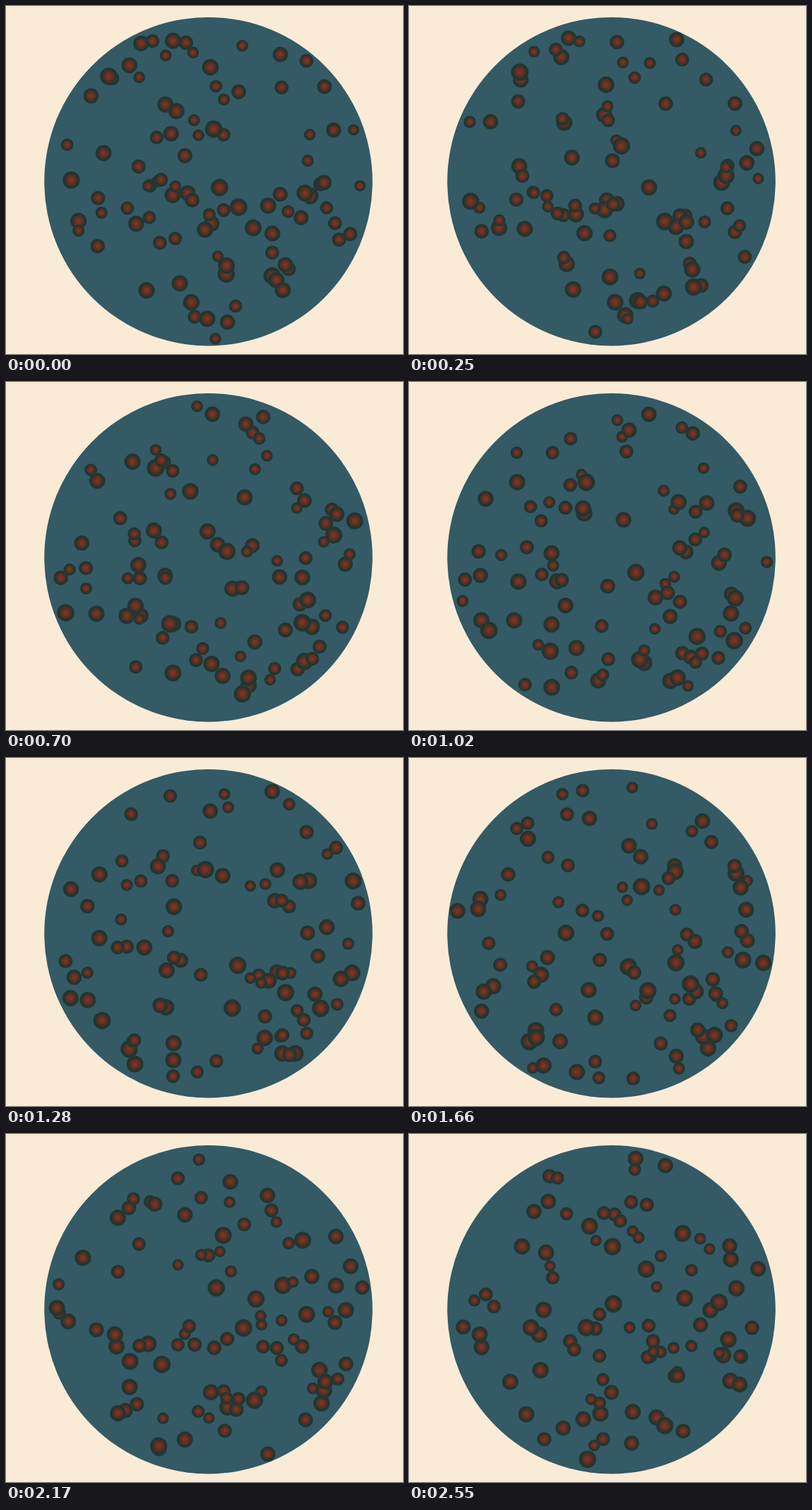
Recreate the animation shown at these times as an HTML page. Size 562x492 px, loop 2600 ms.

```html
<!DOCTYPE html>
<html lang="en">
<head>
<meta charset="utf-8">
<title>Particles in a dish</title>
<style>
  html, body { margin: 0; width: 100%; height: 100%; overflow: hidden; background: #faebd7; }
  svg { display: block; width: 100%; height: 100%; }
</style>
</head>
<body>
<svg id="stage" viewBox="0 0 562 492">
  <defs>
    <radialGradient id="ball">
      <stop offset="0" stop-color="#87341f"/>
      <stop offset=".2" stop-color="#7a321f"/>
      <stop offset=".5" stop-color="#543024"/>
      <stop offset=".7" stop-color="#373129"/>
      <stop offset=".78" stop-color="#20332f"/>
      <stop offset=".94" stop-color="#213835"/>
      <stop offset="1" stop-color="#274448"/>
    </radialGradient>
  </defs>
  <circle cx="286.5" cy="248.2" r="232.3" fill="#335a65"/>
</svg>
<script>
const LOOP = 2600, STEP = 63.8, LEAD = 7;
const CX = 286.5, CY = 248.2, R = 232.3, COUNT = 93;
const stage = document.getElementById("stage");

let seed = 4711;
const rand = () => (seed = (seed * 16807) % 2147483647) / 2147483647;
const between = (lo, hi) => lo + (hi - lo) * rand();

function makeBall() {
  const r = between(8.2, 12.6), limit = R - r;
  // The exponent makes the start a little denser in the middle.
  const dist = limit * Math.pow(rand(), .6);
  const pos = between(0, 2 * Math.PI), dir = between(0, 2 * Math.PI);
  const along = dist * Math.cos(pos - dir), off = dist * Math.sin(pos - dir);
  const half = Math.sqrt(limit * limit - off * off);
  const turn = Math.atan2(off, half) - Math.atan2(off, -half);
  const el = document.createElementNS("http://www.w3.org/2000/svg", "circle");
  el.setAttribute("r", r.toFixed(2));
  el.setAttribute("fill", "url(#ball)");
  stage.append(el);
  return { el, dir, along, off, half, turn, speed: between(80, 160) };
}

const balls = Array.from({ length: COUNT }, makeBall);

// Straight flight along a chord; each bounce turns the chord by a fixed angle.
function place(b, sec) {
  const path = b.along + b.half + b.speed * sec;
  const hits = Math.floor(path / (2 * b.half));
  const u = path - (2 * hits + 1) * b.half;
  const a = b.dir + hits * b.turn, c = Math.cos(a), s = Math.sin(a);
  b.el.setAttribute("cx", (CX + u * c - b.off * s).toFixed(2));
  b.el.setAttribute("cy", (CY + u * s + b.off * c).toFixed(2));
}

function draw(ms) {
  const step = Math.floor((ms % LOOP + LEAD) / STEP);
  for (const b of balls) place(b, step * STEP / 1000);
}

const begin = performance.now();
function tick() {
  draw(performance.now() - begin);
  requestAnimationFrame(tick);
}
tick();
</script>
</body>
</html>
```
